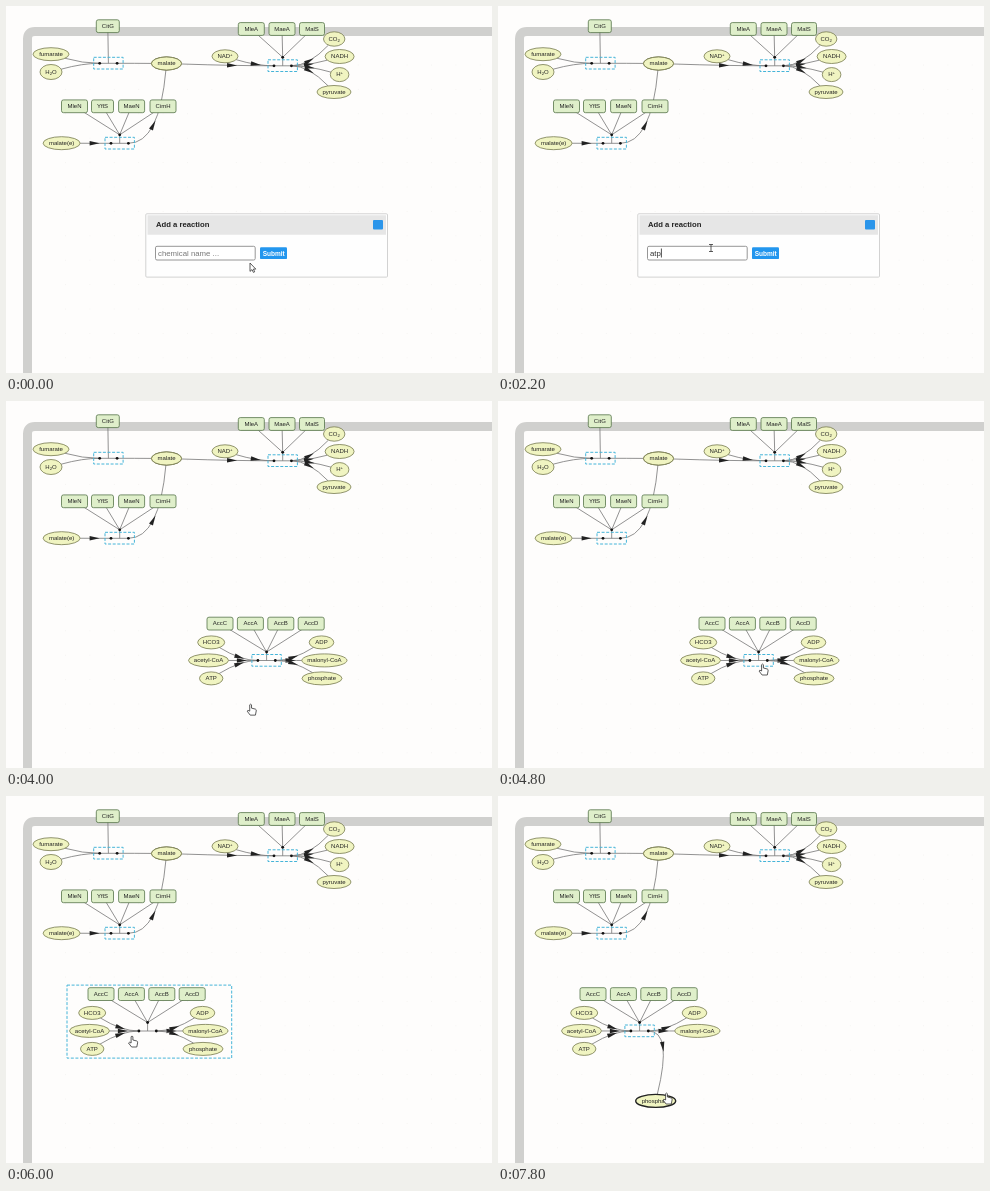
Animation of 486x367 px, one loop 8000 ms. Source, as an HTML page:

```html
<!DOCTYPE html>
<html lang="en">
<head>
<meta charset="utf-8">
<title>Reaction editor</title>
<style>
html, body { margin: 0; width: 100%; height: 100%; overflow: hidden; background: #fefdfc; }
svg { display: block; width: 486px; height: 367px; }
text { font: 7.7px "Liberation Sans", Arial, sans-serif; fill: #444; }
.label { font-size: 6px; fill: #222; text-anchor: middle; }
.label tspan { font-size: 4.3px; }
.bold { font-weight: bold; fill: #222; }
.arrow { font-family: "DejaVu Sans", sans-serif; font-size: 6.1px; }
.frame { fill: none; stroke: #d0d0ce; stroke-width: 9; }
.edge { fill: none; stroke: #777; stroke-width: .8; }
.gene { fill: #dfefca; stroke: #56744a; stroke-width: .8; }
.chemical { fill: #f0f4c1; stroke: #777a50; stroke-width: .8; }
.held { stroke: #222; stroke-width: 1.4; }
.dash { fill: none; stroke: #45b4d8; stroke-width: 1; stroke-dasharray: 3 1.6; }
.cursor { fill: #fff; stroke: #333; stroke-width: .8; stroke-linejoin: round; }
</style>
</head>
<body>
<svg id="stage" viewBox="0 0 486 367"></svg>
<script>
const LOOP = 8000, STEP = 200;
const stage = document.getElementById('stage');

const rect = (x, y, w, h, attrs) => `<rect x="${x}" y="${y}" width="${w}" height="${h}" ${attrs}/>`;
const path = (d, attrs) => `<path d="${d}" ${attrs}/>`;
const dot = (x, y) => `<circle cx="${x}" cy="${y}" r="1.4" fill="#111"/>`;
const text = (x, y, s, cls = '', style = '') => `<text x="${x}" y="${y}" class="${cls}" style="${style}">${s}</text>`;

// "_2" sets a subscript, "^+" a superscript
const label = (x, y, s) => text(x, y + 1.8, s.replace(/([_^])(.)/g,
  (_, kind, c) => `<tspan dy="${kind === '_' ? 1.5 : -2}">${c}</tspan><tspan dy="${kind === '_' ? -1.5 : 2}" style="font-size:6px">&#8203;</tspan>`), 'label');

const chemical = (name, x, y, rx, ry = 6.5) => ({ name, x, y, rx, ry });
const gene = (name, x, y, w = 26) => ({ name, x, y, w });

const drawChemical = c =>
  `<ellipse cx="${c.x}" cy="${c.y}" rx="${c.rx}" ry="${c.ry}" class="chemical ${c.held ? 'held' : ''}"/>` + label(c.x, c.y, c.name);
const drawGene = g => rect(g.x - g.w / 2, g.y - 6.4, g.w, 12.8, 'rx="2" class="gene"') + label(g.x, g.y, g.name);

// Curve between a reaction end (x, y) and a chemical, with an arrow halfway
function drawEdge(x, y, c, side, arrows) {
  const cx = x + side * 0.35 * Math.hypot(c.x - x, c.y - y);
  const dx = cx - c.x, dy = y - c.y;
  const k = 1 / Math.hypot(dx / c.rx, dy / c.ry);
  const ex = c.x + dx * k, ey = c.y + dy * k;
  let out = path(`M${x} ${y}Q${cx} ${y} ${ex} ${ey}`, 'class="edge"');
  if (arrows) {
    const mx = (x + 2 * cx + ex) / 4, my = (3 * y + ey) / 4;
    const angle = Math.atan2(side * (ey - y), side * (ex - x)) * 180 / Math.PI;
    out += path('M-5 -2.2L5 0L-5 2.2Z', `fill="#222" transform="translate(${mx} ${my}) rotate(${angle})"`);
  }
  return out;
}

function drawReaction({ x, y, genes, inputs, outputs, arrows = true, hub = true, boxed = true }) {
  const left = x - 8.7, right = x + 8.7, hubY = hub ? y - 8.5 : y;
  return genes.map(g => path(`M${g.x} ${g.y}L${x} ${hubY}`, 'class="edge"')).join('')
    + path(`M${left} ${y}H${right}M${x} ${hubY}V${y}`, 'class="edge"')
    + inputs.map(c => drawEdge(left, y, c, -1, arrows)).join('')
    + outputs.map(c => drawEdge(right, y, c, 1, arrows)).join('')
    + (boxed ? rect(x - 14.7, y - 6, 29.4, 11.7, 'class="dash"') : '')
    + dot(left, y) + dot(right, y) + (hub ? dot(x, hubY) : '')
    + genes.map(drawGene).join('') + [...inputs, ...outputs].map(drawChemical).join('');
}

const malate = chemical('malate', 160.5, 57.5, 15);
const pathway = [
  { x: 102.4, y: 57.3, arrows: false, hub: false, genes: [gene('CitG', 101.8, 20.2, 23)],
    inputs: [chemical('fumarate', 45, 48.2, 18), chemical('H_2O', 45, 66, 11, 7.5)], outputs: [malate] },
  { x: 276.7, y: 59.8, genes: [gene('MleA', 245.3, 23), gene('MaeA', 276, 23), gene('MalS', 306, 23, 25)],
    inputs: [malate, chemical('NAD^+', 219, 50.3, 13)],
    outputs: [chemical('CO_2', 328.2, 33, 10.7, 7.2), chemical('NADH', 333.6, 50.5, 14.5, 7),
      chemical('H^+', 333.6, 68.6, 9.3, 7), chemical('pyruvate', 328, 86, 17)] },
  { x: 113.7, y: 137.3, genes: [gene('MleN', 68.5, 100.3), gene('YflS', 96.5, 100.3, 22),
      gene('MaeN', 125.6, 100.3), gene('CimH', 157, 100.3)],
    inputs: [chemical('malate(e)', 55.6, 137.2, 18.5)], outputs: [malate] }
];

let gridDots = '';
for (let y = 59; y < 367; y += 24.4)
  for (let x = 59; x < 486; x += 24.4) gridDots += `M${x} ${y}h1`;

const background = rect(0, 0, 486, 367, 'fill="#fefdfc"')
  + path(gridDots, 'stroke="#f5f4f2"')
  + path('M21.5 380V33Q21.5 25.5 29 25.5H500', 'class="frame"')
  + pathway.map(drawReaction).join('');

// Linear interpolation over [time, ...values] keys
function at(keys, t) {
  const next = keys.findIndex(k => k[0] > t);
  if (next < 0) return keys[keys.length - 1].slice(1);
  if (next === 0) return keys[0].slice(1);
  const a = keys[next - 1], b = keys[next], p = (t - a[0]) / (b[0] - a[0]);
  return a.slice(1).map((v, i) => v + (b[i + 1] - v) * p);
}

const cursorKeys = [
  [0, 244, 257], [400, 242, 255], [1000, 213, 242], [2400, 213, 242], [2600, 232, 340], [2800, 236, 357],
  [3000, 238, 340], [3200, 238, 316.5], [3800, 238, 316.5], [4600, 264.5, 263], [5000, 264.5, 263],
  [5600, 161.5, 273], [6000, 126, 240], [6200, 138, 248], [6600, 180.5, 268.5], [7000, 209, 250],
  [7200, 195, 275], [7400, 182, 293], [7600, 172, 311], [7800, 168.5, 297]
];
const groupKeys = [[5000, 0, 0], [5600, -83, 8.4], [6000, -119, -24.5]];
const phosphateKeys = [[7000, 0, 0], [7200, -14, 25], [7400, -27, 43], [7600, -36, 61], [7800, -39.3, 52]];

function newReaction(t) {
  const [dx, dy] = at(groupKeys, t), [px, py] = at(phosphateKeys, t);
  const selected = t >= 5000 && t <= 6000;
  const move = o => ({ ...o, x: o.x + dx, y: o.y + dy });
  const phosphate = chemical('phosphate', 316 + px, 277.4 + py, 20);
  phosphate.held = t >= 7000;
  return drawReaction({
    x: 260.6 + dx, y: 259.5 + dy, boxed: !selected,
    genes: ['AccC', 'AccA', 'AccB', 'AccD'].map((name, i) => move(gene(name, 214 + i * 30.4, 222.6))),
    inputs: [chemical('HCO3', 205.2, 241.4, 13.5), chemical('acetyl-CoA', 202.5, 259.4, 20),
      chemical('ATP', 205.2, 277.4, 11.7)].map(move),
    outputs: [chemical('ADP', 315.5, 241.4, 12.3), chemical('malonyl-CoA', 318.4, 259.4, 22.6), phosphate].map(move)
  }) + (selected ? rect(180 + dx, 213.6 + dy, 164.7, 73, 'class="dash"') : '');
}

const results = [
  { lines: ['R1: saturated fatty acid + CoA-SH + ATP ⟹ saturated', 'fatty acyl-CoA + AMP + diphosphate'], y: 276.6 },
  { lines: ['R17: acetyl-CoA + ATP + HCO3 ⟹ malonyl-CoA +', 'ADP + phosphate'], y: 311 },
  { lines: ['R26: deoxyadenosine + ATP ⟹ dAMP + ADP'], y: 344.4 },
  { lines: ['R27: dAMP + ATP ⟹ dADP + ADP'], y: 368 }
];

function drawResults(pointerY) {
  const rows = results.map(({ lines, y }) => {
    const hovered = pointerY > y - 12 && pointerY < y + lines.length * 11;
    return lines.map((line, i) => text(156.7, y + i * 10.7,
      line.replace('⟹', '<tspan class="arrow">⟹</tspan>'), hovered ? 'bold' : '')).join('');
  }).join('');
  return rows + path('M154 295.7H350M154 328.2H350M154 353H350', 'stroke="#eee"')
    + rect(356, 262, 7.5, 110, 'fill="#f3f3f3"') + rect(356.7, 270.5, 6, 12.5, 'fill="#c1c1c1"')
    + path('M357.7 267.4H361.7L359.7 265Z', 'fill="#777"')
    + rect(372, 229, 8, 140, 'fill="#f1f1f1"') + rect(372.7, 237, 6.3, 140, 'fill="#c1c1c1"')
    + path('M374 234.2H378L376 231.8Z', 'fill="#777"');
}

function drawDialog(t, pointerY) {
  const listed = t >= 2400;
  const typed = 'atp'.slice(0, t < 1400 ? 0 : 1 + (t - 1400) / 200);
  const caret = typed && !listed;
  return rect(139.8, 207.8, 241.7, listed ? 180 : 63.3, 'fill="#fefefe" stroke="#d2d2d2" rx="1"')
    + rect(141.5, 209.3, 238.5, 19.4, 'fill="#e6e6e6"')
    + text(150, 221.2, 'Add a reaction', 'bold')
    + rect(367, 214, 10, 9.6, 'rx="1" fill="#2b95ea"')
    + rect(149.5, 240.3, 99.7, 13.7, 'rx="1.5" fill="#fff" stroke="#969696"')
    + text(152, 249.7, typed || 'chemical name ...', '', `font-size:7.8px;fill:${typed ? '#333' : '#777'}`)
    + (caret ? path(`M${152.5 + [0, 4.3, 6.5, 10.9][typed.length]} 242.5V251.5`, 'stroke="#222" stroke-width=".8"') : '')
    + rect(254, 241.3, 27, 11.8, 'rx="1.2" fill="#2396ee"')
    + text(256.7, 249.6, 'Submit', 'bold', 'font-size:6.5px;fill:#fff')
    + (listed ? drawResults(pointerY) : '');
}

const cursorShapes = {
  arrow: 'M0 0V8.4L2 6.6L3.4 9.4L4.7 8.8L3.4 6.1H5.8Z',
  beam: 'M-2 -3.5H2M0 -3.5V3.5M-2 3.5H2',
  hand: 'M-.9 .7Q0 -.6 .9 .7V4L4.8 5Q5.9 5.4 5.6 6.8L4.8 11H-.4L-3.5 7Q-3.2 5.5 -.9 7Z'
};

function cursorKind(t) {
  if (t < 800 || (t >= 6200 && t < 7000)) return 'arrow';
  return t <= 2400 ? 'beam' : 'hand';
}

function render(t) {
  const [x, y] = at(cursorKeys, t);
  stage.innerHTML = background
    + (t < 4000 ? drawDialog(t, y) : newReaction(t))
    + path(cursorShapes[cursorKind(t)], `class="cursor" transform="translate(${x} ${y})"`);
}

let shown = -1;
function tick(now) {
  const t = Math.floor((now % LOOP) / STEP) * STEP;
  if (t !== shown) render(shown = t);
  requestAnimationFrame(tick);
}
render(0);
requestAnimationFrame(tick);
</script>
</body>
</html>
```
